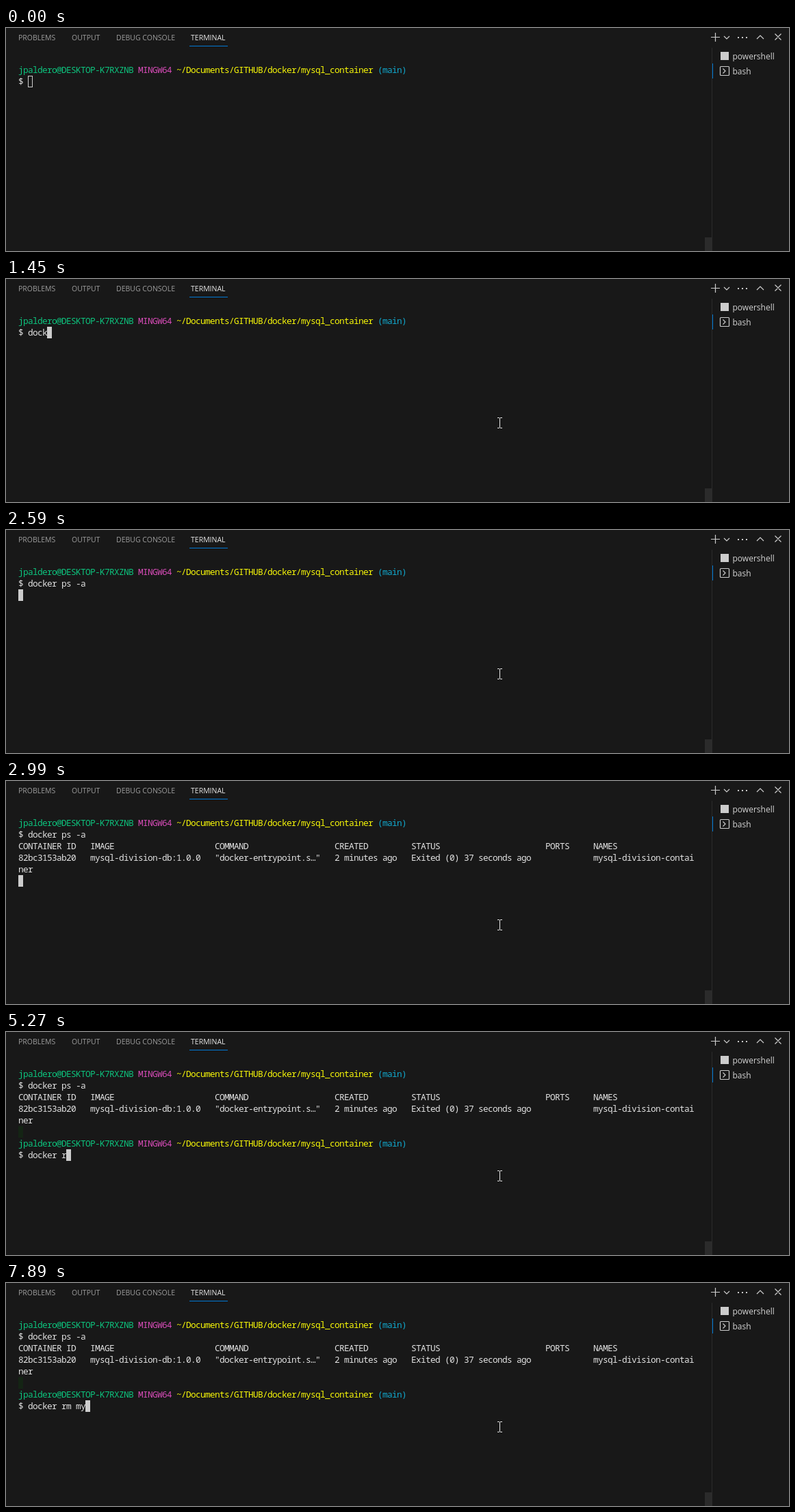
These frames come from a looping animation (1144 px wide and 327 px high, 8000 ms). An HTML page:

```html
<!DOCTYPE html>
<html lang="en">
<head>
<meta charset="utf-8">
<title>Terminal session</title>
<style>
  html, body { margin: 0; width: 100%; height: 100%; overflow: hidden; background: #181818; }
  svg { display: block; }
  text { white-space: pre; fill: #d4d4d4; font: 12px "Open Sans", "Noto Sans", sans-serif; }
  #tabs text { font-size: 10.5px; fill: #9d9d9d; }
  #tabs .active { fill: #e7e7e7; }
  /* Glyphs are set tight on a 7px cell grid. */
  #term text { font: 500 12.8px "Noto Sans Mono", "DejaVu Sans Mono", monospace; letter-spacing: -.68px; }
  .icon { fill: none; stroke: #ccc; stroke-width: 1.2; }
</style>
</head>
<body>
<svg width="1144" height="327" viewBox="0 0 1144 327">
  <g id="tabs">
    <text x="18" y="18">PROBLEMS</text>
    <text x="96" y="18">OUTPUT</text>
    <text x="161" y="18">DEBUG CONSOLE</text>
    <text x="270" y="18" class="active">TERMINAL</text>
    <rect x="268" y="26" width="56" height="1" fill="#0078d4"/>
  </g>
  <g class="icon">
    <path d="M1036.5 7v13M1030 13.5h13M1049 12l4 4 4-4M1097 16l5-5 5 5M1123.500 8.500l9 9m0-9l-9 9"/>
    <path d="M1069 14h2m4 0h2m4 0h2" stroke-width="2"/>
    <rect x="1043.500" y="56.500" width="13" height="13" rx="1"/>
    <path d="M1047.500 59.500l3.500 3.500-3.500 3.500"/>
  </g>
  <rect x="1044" y="35" width="12" height="12" fill="#ccc"/>
  <text x="1061.500" y="46">powershell</text>
  <text x="1061.500" y="68">bash</text>
  <rect x="1031" y="29" width="1" height="298" fill="#2b2b2b"/>
  <rect x="1032" y="52" width="1" height="22" fill="#0078d4"/>
  <rect x="1021" y="307" width="10" height="20" fill="#2b2b2b"/>
  <g id="term">
    <g id="first"></g>
    <g id="output"></g>
    <g id="second"></g>
    <rect id="cursor" stroke="#ccc"/>
  </g>
  <path id="mouse" d="M-3.500-7.500h3m1 0h3M0-7v14M-3.500 7.500h3m1 0h3" fill="none" stroke="#e8e8e8"/>
</svg>
<script>
const LOOP = 8000, CELL = 7, ROW = 17, LEFT = 18, TOP = 53;
const $ = id => document.getElementById(id);
const colX = col => LEFT + CELL * col;
const rowY = row => TOP + ROW * row;

const text = (row, col, str, color = "#e2e2e2") =>
  `<text x="${colX(col)}" y="${rowY(row) + 13}" style="fill:${color}">${str}</text>`;

const prompt = row =>
  text(row, 0, "jpaldero@DESKTOP-K7RXZNB", "#0dc47e") +
  text(row, 25, "MINGW64", "#d84cb8") +
  text(row, 33, "~/Documents/GITHUB/docker/mysql_container", "#f8f808") +
  text(row, 75, "(main)", "#11a8cd") +
  text(row + 1, 0, "$");

const columns = [0, 15, 41, 66, 82, 110, 120];
const tableRow = (row, cells) => cells.map((cell, i) => text(row, columns[i], cell)).join("");

$("first").innerHTML = prompt(0) + text(1, 2, "");
$("output").innerHTML =
  tableRow(2, ["CONTAINER ID", "IMAGE", "COMMAND", "CREATED", "STATUS", "PORTS", "NAMES"]) +
  tableRow(3, ["82bc3153ab20", "mysql-division-db:1.0.0", '"docker-entrypoint.s…"',
    "2 minutes ago", "Exited (0) 37 seconds ago", "", "mysql-division-contai"]) +
  text(4, 0, "ner");
$("second").innerHTML =
  `<rect x="${LEFT}" y="${rowY(5)}" width="${CELL}" height="${ROW}" fill="#142414"/>` +
  prompt(6) + text(7, 2, "");

// Keystrokes as [time, key]; "<" is backspace.
const listKeys = [[930, "d"], [1190, "o"], [1320, "c"], [1450, "k"], [1520, "e"], [1590, "r"],
  [1660, " "], [1800, "p"], [1990, "s"], [2120, " "], [2260, "-"], [2390, "a"]];
const removeKeys = [[3680, "do"], [3810, "c"], [3940, "k"], [4010, "e"], [4150, "r"], [4210, " "],
  [5270, "r"], [5400, "m"], [5750, " "], [6150, "<"], [6480, " "], [7410, "m"], [7890, "y"]];
const typed = (keys, t) => keys.reduce((line, [time, key]) =>
  t < time ? line : key === "<" ? line.slice(0, -1) : line + key, "");

const mousePath = [[70, 862, 270], [150, 785, 238], [240, 738, 218], [330, 721, 211]];

const show = (id, on) => $(id).style.display = on ? "" : "none";

function placeCursor(row, col, focused) {
  const box = { x: colX(col) + .5, y: rowY(row) + .5, width: CELL - 1, height: ROW - 1,
    fill: focused ? "#ccc" : "none" };
  for (const key in box) $("cursor").setAttribute(key, box[key]);
}

function render(t) {
  const list = typed(listKeys, t), remove = typed(removeKeys, t);
  $("first").lastChild.textContent = list;
  $("second").lastChild.textContent = remove;
  show("output", t >= 2930);
  show("second", t >= 3150);

  const [row, col] = t < 2590 ? [1, 2 + list.length]
    : t < 2930 ? [2, 0]
    : t < 2990 ? [4, 3]
    : t < 3150 ? [5, 0]
    : [7, 2 + remove.length];
  placeCursor(row, col, t >= 400);

  const spot = mousePath.filter(([time]) => t >= time).pop();
  show("mouse", spot);
  if (spot) $("mouse").setAttribute("transform", `translate(${spot[1] + .5} ${spot[2]})`);
}

const start = performance.now();
function tick() {
  render((performance.now() - start) % LOOP);
  requestAnimationFrame(tick);
}
tick();
</script>
</body>
</html>
```
